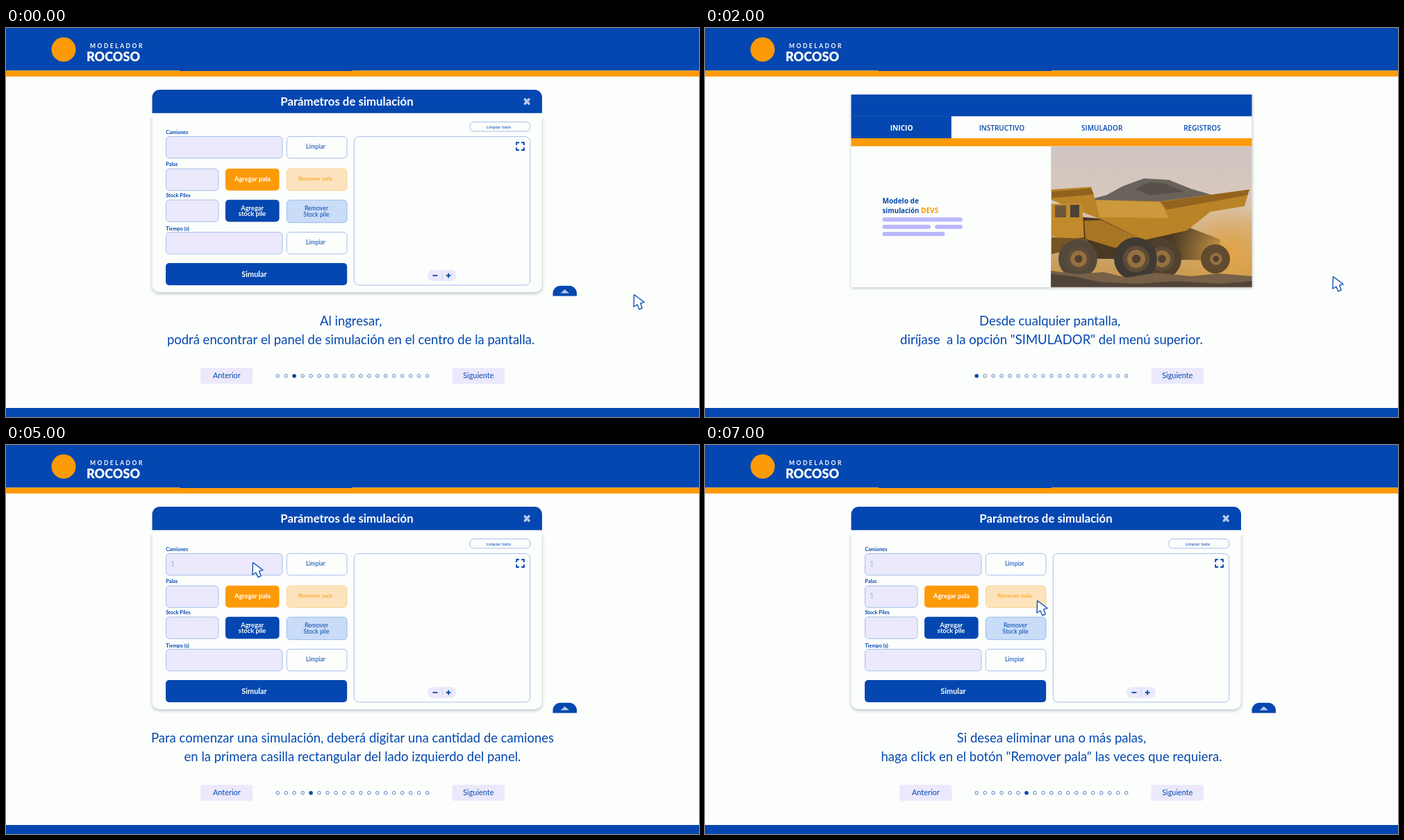
Recreate the animation shown at these times as an HTML page with a canvas. Size 998 by 561 pixels, loop 8000 ms.

```html
<!DOCTYPE html>
<html lang="es">
<head>
<meta charset="utf-8">
<title>Instructivo</title>
<style>
  html, body { margin: 0; width: 100%; height: 100%; overflow: hidden; background: #fcfefc; }
  canvas { display: block; }
</style>
</head>
<body>
<canvas id="stage" width="998" height="561"></canvas>
<script>
const ctx = document.getElementById('stage').getContext('2d');
const BLUE = '#0447b0', ORANGE = '#fd9a08', PAPER = '#fcfefc', LILAC = '#ebe9fb',
      BAR = '#b9b8fb', EDGE = '#a8bdeb', SKYBLUE = '#9bb5de', SAND = '#fdd596';
const LATO = 'Lato, sans-serif', OPEN = '"Open Sans", sans-serif';
const SLOT = 1000;

// One entry per second of the loop.
const scenes = [
  { step: 2, view: panel, cursor: [904, 384],
    lines: ['Al ingresar, ', 'podrá encontrar el panel de simulación en el centro de la pantalla. '] },
  { step: 1, view: welcome, cursor: [621, 148],
    lines: ['Una vez allí, ', 'haga click en el botón amarillo "abrir simulador"'] },
  { step: 0, view: home, cursor: [904, 358],
    lines: ['Desde cualquier pantalla, ', 'diríjase  a la opción "SIMULADOR" del menú superior.'] },
  { step: 0, view: home, cursor: [621, 148],
    lines: ['Desde cualquier pantalla, ', 'diríjase  a la opción "SIMULADOR" del menú superior.'] },
  { step: 1, view: welcome, cursor: [601, 331],
    lines: ['Una vez allí, ', 'haga click en el botón amarillo "abrir simulador"'] },
  { step: 4, view: panel, cursor: [355, 169], trucks: '1',
    lines: ['Para comenzar una simulación, deberá digitar una cantidad de camiones',
            'en la primera casilla rectangular del lado izquierdo del panel.'] },
  { step: 5, view: panel, cursor: [379, 224], trucks: '1', shovels: '2',
    lines: ['Si desea agregar una o más palas,',
            'haga click en el botón "Agregar pala" las veces que requiera.'] },
  { step: 6, view: panel, cursor: [478, 224], trucks: '1', shovels: '1',
    lines: ['Si desea eliminar una o más palas,',
            'haga click en el botón "Remover pala" las veces que requiera.'] }
];

function rect(x, y, w, h, color) {
  ctx.fillStyle = color;
  ctx.fillRect(x, y, w, h);
}

function box(x, y, w, h, r, fill, stroke, width = 1) {
  ctx.beginPath();
  ctx.roundRect(x, y, w, h, r);
  if (fill) { ctx.fillStyle = fill; ctx.fill(); }
  if (stroke) { ctx.strokeStyle = stroke; ctx.lineWidth = width; ctx.stroke(); }
}

function disc(x, y, r, color) {
  ctx.beginPath();
  ctx.arc(x, y, r, 0, Math.PI * 2);
  ctx.fillStyle = color;
  ctx.fill();
}

function poly(points, color) {
  ctx.beginPath();
  points.forEach(([x, y]) => ctx.lineTo(x, y));
  ctx.closePath();
  ctx.fillStyle = color;
  ctx.fill();
}

function line(color, width, ...points) {
  ctx.beginPath();
  points.forEach(([x, y], i) => i ? ctx.lineTo(x, y) : ctx.moveTo(x, y));
  ctx.strokeStyle = color;
  ctx.lineWidth = width;
  ctx.stroke();
}

function text(str, x, y, size, color = BLUE, weight = 400, align = 'center', family = LATO) {
  ctx.font = `${weight} ${size}px ${family}`;
  ctx.textAlign = align;
  ctx.fillStyle = color;
  ctx.fillText(str, x, y);
}

function shadowed(draw, blur, alpha, dy) {
  ctx.save();
  ctx.shadowColor = `rgba(20,30,70,${alpha})`;
  ctx.shadowBlur = blur;
  ctx.shadowOffsetY = dy;
  draw();
  ctx.restore();
}

function frame({ step, lines }) {
  rect(0, 0, 998, 561, PAPER);
  rect(0, 0, 998, 61.5, BLUE);
  rect(0, 61.5, 998, 8.5, ORANGE);
  rect(250, 61, 249, 1, BLUE);
  rect(0, 548, 998, 13, BLUE);

  disc(83, 31, 17.5, ORANGE);
  ctx.letterSpacing = '2.5px';
  text('MODELADOR', 121, 29, 8.5, '#fff', 700, 'left');
  ctx.letterSpacing = '0px';
  text('ROCOSO', 116, 47.5, 18, '#fff', 900, 'left');

  text(lines[0], 499, 429, 18.5);
  text(lines[1], 499, 455.5, 18.5);
  if (step > 0) navButton('Anterior', 280);
  navButton('Siguiente', 642.5);
  for (let i = 0; i < 19; i++) {
    const x = 391.2 + i * 11.97;
    if (i === step) disc(x, 501.7, 2.8, BLUE);
    else box(x - 2.3, 499.4, 4.6, 4.6, 2.3, null, '#3f72c4', 0.9);
  }
}

function navButton(label, x) {
  box(x, 490, 75.5, 23.3, 4, LILAC);
  text(label, x + 37.8, 505.3, 10.9);
}

function bars(color, h, ...rows) {
  rows.forEach(([x, y, w]) => box(x, y, w, h, h / 2, color));
}

function site(active) {
  shadowed(() => rect(210.5, 96, 577, 278, PAPER), 4, 0.3, 1);
  rect(210.5, 96, 577, 31.3, BLUE);
  ['INICIO', 'INSTRUCTIVO', 'SIMULADOR', 'REGISTROS'].forEach((label, i) => {
    const x = 210.5 + i * 144.3, on = i === active;
    if (on) {
      rect(x, 127, 144.3, 32, BLUE);
      rect(x, 127, 144.3, 0.5, '#2c63bb');
    }
    text(label, x + 72.6, 147.7, 10.1, on ? '#fff' : BLUE, on ? 700 : 600, 'center', OPEN);
  });
  rect(210.5, 159, 577, 11.5, ORANGE);
}

function home() {
  site(0);
  text('Modelo de', 255.5, 252.5, 10.1, BLUE, 700, 'left', OPEN);
  text('simulación', 255.5, 266.8, 9.7, BLUE, 700, 'left', OPEN);
  text('DEVS', 311, 266.8, 10.1, ORANGE, 700, 'left', OPEN);
  bars(BAR, 6, [255.5, 273.3, 115.5], [255.5, 283.7, 69.5], [331, 283.7, 40], [255.5, 294, 90]);
  truckPhoto();
}

function truckPhoto() {
  ctx.save();
  ctx.beginPath();
  ctx.rect(498.2, 170.5, 289.3, 203);
  ctx.clip();
  const sky = ctx.createLinearGradient(0, 170, 0, 350);
  sky.addColorStop(0, '#d0c5c2');
  sky.addColorStop(0.5, '#d8c8ba');
  sky.addColorStop(1, '#c89a52');
  rect(498, 170, 290, 204, sky);

  poly([[545, 250], [578, 241], [602, 228], [632, 217], [668, 219], [700, 232], [742, 244], [700, 256]], '#69635c');
  poly([[620, 232], [640, 222], [662, 224], [690, 236], [640, 241]], '#57514a');
  poly([[512, 270], [690, 285], [742, 305], [740, 335], [510, 332]], '#4a3922');

  const dust = ctx.createRadialGradient(755, 325, 5, 755, 325, 85);
  dust.addColorStop(0, 'rgba(226,164,70,.95)');
  dust.addColorStop(1, 'rgba(217,165,85,0)');
  rect(640, 240, 150, 134, dust);

  // Tub, cab and chassis
  poly([[499, 233], [556, 229], [562, 248], [656, 250], [784, 233], [777, 257], [728, 265], [694, 292], [632, 306], [570, 276], [499, 248]], '#b98327');
  poly([[562, 248], [656, 251], [668, 274], [568, 273]], '#cc9a3c');
  poly([[656, 251], [784, 233], [781, 241], [665, 262]], '#94631d');
  poly([[499, 236], [556, 231], [560, 240], [499, 245]], '#8f621f');
  poly([[499, 254], [543, 252], [546, 302], [518, 306], [499, 300]], '#c18a2c');
  rect(526, 255, 13, 18, '#4b4236');
  rect(504, 256, 16, 17, '#6b573b');
  poly([[546, 278], [570, 277], [632, 306], [590, 317], [548, 304]], '#a87523');
  poly([[499, 302], [548, 304], [556, 313], [499, 326]], '#765323');

  [[735, 333, 21, '#614a2e'], [657, 333, 29, '#51402d'], [537, 333, 28, '#54483b'], [620, 333, 31, '#403a35']]
    .forEach(([x, y, r, tire]) => {
      disc(x, y, r, tire);
      disc(x + 1, y, r * 0.62, '#5e4c38');
      disc(x + 1, y, r * 0.42, '#967040');
      disc(x + 1, y, r * 0.2, '#504030');
    });
  poly([[498, 350], [536, 355], [574, 352], [607, 360], [650, 353], [700, 358], [740, 354], [788, 358], [788, 374], [498, 374]], '#766047');
  poly([[498, 354], [535, 359], [568, 366], [620, 369], [680, 365], [740, 369], [788, 365], [788, 374], [498, 374]], '#50443a');
  ctx.restore();
}

function welcome() {
  site(2);
  rect(210.5, 170.5, 288.5, 203.5, LILAC);
  shadowed(() => box(279.3, 223, 150.4, 84.5, [10, 10, 9, 9], PAPER), 4, 0.3, 1);
  box(279.5, 236.3, 150, 71, [0, 0, 9, 9], PAPER, '#5f87c9', 0.8);
  box(279, 223, 151, 11.3, [10, 10, 0, 0], BLUE);
  bars('#e4e1fa', 11.7, [284, 242, 140], [284, 258.6, 65], [284, 275.2, 65]);
  bars(SAND, 11.7, [354.5, 258.6, 31.5]);
  bars(SKYBLUE, 11.7, [354.5, 275.2, 31.5], [284, 292, 140]);
  box(393.5, 260.2, 28.8, 8.5, 4.25, PAPER, SAND, 3.4);
  box(393.5, 276.8, 28.8, 8.5, 4.25, PAPER, SKYBLUE, 3.4);

  text('Bienvenido/a', 529.8, 252.7, 9.9, BLUE, 600, 'left', OPEN);
  bars(BAR, 6, [530.5, 262, 115.5], [530.5, 273.3, 38.5], [574, 273.3, 104], [530.5, 284.8, 58], [593, 284.8, 58]);
  box(530.5, 318.3, 81, 20.6, 8.5, ORANGE);
  text('Abrir simulador', 571, 331, 6.9, '#fff', 700);
  box(617.5, 318.8, 80.5, 19.8, 8.5, '#f9f8fc', '#fcc06b');
}

function panel({ trucks, shovels }) {
  shadowed(() => box(210.5, 127, 561.3, 254, [0, 0, 10, 10], PAPER), 5, 0.28, 2);
  rect(205, 121, 572, 8, PAPER);
  box(210.5, 89, 561.5, 33.8, [11, 11, 0, 0], BLUE);
  text('Parámetros de simulación', 491, 111.5, 16.8, '#fff', 700);
  ctx.lineCap = 'round';
  line('#b3c9ec', 3.6, [747.4, 102.9], [753, 109.1]);
  line('#b3c9ec', 3.6, [753, 102.9], [747.4, 109.1]);
  ctx.lineCap = 'butt';

  [['Camiones', 153], ['Palas', 198.6], ['Stock Piles', 244.2], ['Tiempo (s)', 291.6]]
    .forEach(([label, y]) => text(label, 230.2, y, 7.4, BLUE, 700, 'left'));
  [[156.5, 167.5], [203, 75.5], [248, 75.5], [294.5, 167.5]]
    .forEach(([y, w]) => box(230.5, y, w, 31.3, 5, LILAC, EDGE));
  if (trucks) text(trucks, 236.8, 175.3, 11.5, EDGE, 400, 'left');
  if (shovels) text(shovels, 236.8, 221.3, 11.5, EDGE, 400, 'left');

  [156.5, 294.5].forEach(y => {
    box(404.3, y, 86.7, 31.3, 5, PAPER, EDGE);
    text('Limpiar', 446, y + 17.3, 8.6);
  });
  box(316, 202.7, 77.6, 31.8, 5, ORANGE);
  text('Agregar pala', 355, 220.8, 9.3, '#fff', 700);
  box(404.3, 203, 86.7, 31.3, 5, '#fde3bd', '#fbd193');
  text('Remover pala', 445.6, 219.6, 8.3, ORANGE);
  box(316, 247.7, 77.6, 31.8, 5, BLUE);
  text('Agregar', 354.6, 262.5, 9.3, '#fff', 700);
  text('stock pile', 354.6, 271.4, 9.3, '#fff', 700);
  box(404.3, 248.2, 86.7, 32.5, 5, '#c9ddf8', '#98bbec');
  text('Remover', 447, 262.6, 8.8);
  text('Stock pile', 447, 272.2, 8.8);
  box(230, 339, 261.2, 32, 5, BLUE);
  text('Simular', 357.5, 359, 10.9, '#fff', 700);

  box(668.2, 135.5, 86.5, 13.5, 5, PAPER, EDGE);
  text('Limpiar todo', 709.6, 144.6, 6.4);
  box(501.3, 156.6, 253.5, 214.3, 7, PAPER, EDGE);
  [[735.2, 1], [746, -1]].forEach(([x, dx]) =>
    [[165.2, 1], [176, -1]].forEach(([y, dy]) =>
      line(BLUE, 1.9, [x + dx * 3.8, y], [x, y], [x, y + dy * 3.8])));
  box(607, 349, 42, 15.7, 7.8, LILAC);
  line('#c5c9ee', 0.8, [628, 350], [628, 364]);
  line(BLUE, 1.8, [614.6, 357], [621.4, 357]);
  line(BLUE, 1.8, [633.8, 357], [640.6, 357]);
  line(BLUE, 1.8, [637.2, 353.6], [637.2, 360.4]);

  box(787.5, 371.7, 34.5, 14.8, [11, 11, 0, 0], BLUE);
  poly([[798.5, 382.5], [804.8, 377], [811, 382.5]], '#b3c9ec');
}

function pointer([x, y]) {
  ctx.save();
  ctx.translate(x, y);
  ctx.lineJoin = 'round';
  ctx.beginPath();
  [[0.6, 0.6], [15.2, 11.4], [9.6, 13], [12.2, 19.8], [8, 21.8], [5, 15], [0, 18]]
    .forEach(([px, py]) => ctx.lineTo(px, py));
  ctx.closePath();
  ctx.fillStyle = '#fff';
  ctx.fill();
  ctx.strokeStyle = BLUE;
  ctx.lineWidth = 1.3;
  ctx.stroke();
  ctx.restore();
}

const start = performance.now();
function draw() {
  const elapsed = performance.now() - start;
  const scene = scenes[Math.floor(elapsed / SLOT) % scenes.length];
  frame(scene);
  scene.view(scene);
  pointer(scene.cursor);
  requestAnimationFrame(draw);
}
draw();
</script>
</body>
</html>
```
